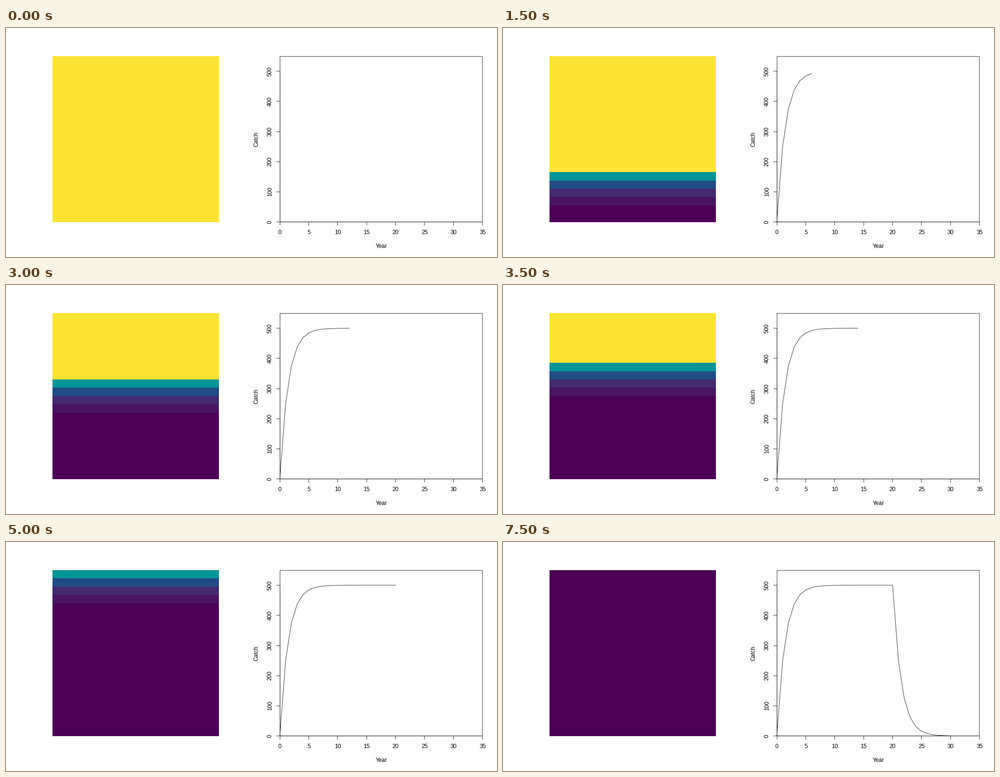
A matplotlib script for the animation above (7750 ms loop, 1024 by 480 pixels).

```python
import numpy as np
import matplotlib.pyplot as plt
from matplotlib.animation import FuncAnimation
from matplotlib.patches import Rectangle

plt.rcParams.update({"font.family": "Liberation Sans", "font.size": 12,
                     "text.hinting": "force_autohint", "path.simplify": False})

WIDTH, HEIGHT, DPI = 1024, 480, 72
FRAMES, INTERVAL = 31, 250
LINE = 14.4                                   # height of one margin line
LEFT, RIGHT = 512 + 4.1 * LINE, WIDTH - 2.1 * LINE
TOP, BOTTOM = 4.1 * LINE, HEIGHT - 5.1 * LINE
ROWS, LEVELS, YIELD = 20, 20, 500


def viridis_hcl(level):
    """Sequential hue-chroma-luminance ramp, level 0 (dark) to LEVELS - 1."""
    i = 1 - level / (LEVELS - 1)
    lum = 90 - 75 * i ** 1.1
    chroma = 95 - 55 * i
    hue = np.radians(75 + 225 * i)
    u = chroma * np.cos(hue) / (13 * lum) + 0.1978
    v = chroma * np.sin(hue) / (13 * lum) + 0.4683
    y = ((lum + 16) / 116) ** 3
    x = y * 9 * u / (4 * v)
    z = y * (12 - 3 * u - 20 * v) / (4 * v)
    rgb = np.array([[3.2406, -1.5372, -0.4986],
                    [-0.9689, 1.8758, 0.0415],
                    [0.0557, -0.2040, 1.0570]]) @ [x, y, z]
    rgb = np.clip(rgb, 0, 1)
    rgb = np.where(rgb > 0.00304, 1.055 * rgb ** (1 / 2.4) - 0.055, 12.92 * rgb)
    return tuple(np.clip(rgb, 0, 1))


PALETTE = [viridis_hcl(k) for k in range(LEVELS)]


def row_color(age):
    biomass = 0.5 ** max(age, 0)
    return PALETTE[int((LEVELS - 1e-5) * biomass)]


def px(year):
    return LEFT + (RIGHT - LEFT) * np.asarray(year) / 35


def py(catch):
    return BOTTOM - (BOTTOM - TOP) * np.asarray(catch) / 550


def crisp(values):
    return np.floor(values) + 0.5


fig = plt.figure(figsize=(WIDTH / DPI, HEIGHT / DPI), dpi=DPI, facecolor="white")
ax = fig.add_axes([0, 0, 1, 1])
ax.set(xlim=(0, WIDTH), ylim=(HEIGHT, 0))
ax.axis("off")


def stroke(xs, ys):
    line, = ax.plot(xs, ys, color="black", lw=0.75, snap=False,
                    solid_capstyle="round", solid_joinstyle="round")
    return line


def label(x, y, text, rotation=0):
    ax.text(x, y, text, ha="center", va="baseline", rotation=rotation,
            rotation_mode="anchor", color="black")


# Field rows, fished from the bottom up
side = BOTTOM - TOP
center = 4.1 * LINE + (RIGHT - LEFT) / 2
x0, x1 = round(center - side / 2), round(center + side / 2)
edges = np.round(BOTTOM - side * np.arange(ROWS + 1) / ROWS)
rows = [ax.add_patch(Rectangle((x0, hi), x1 - x0, lo - hi, lw=0, antialiased=False))
        for lo, hi in zip(edges[:-1], edges[1:])]

# Box, axes and labels
left, right, top, bottom = crisp(np.array([LEFT, RIGHT, TOP, BOTTOM]))
stroke([left, right, right, left, left], [bottom, bottom, top, top, bottom])
stroke([left, right], [bottom, bottom])
stroke([left, left], [bottom, crisp(py(500))])
for year in range(0, 36, 5):
    x = crisp(px(year))
    stroke([x, x], [bottom, BOTTOM + LINE / 2])
    label(px(year), BOTTOM + 1.8 * LINE, str(year))
for catch in range(0, 501, 100):
    y = crisp(py(catch))
    stroke([left, LEFT - LINE / 2], [y, y])
    label(LEFT - 1.2 * LINE, py(catch), str(catch), 90)
label((LEFT + RIGHT) / 2, BOTTOM + 3.8 * LINE, "Year")
label(LEFT - 3.2 * LINE, (TOP + BOTTOM) / 2, "Catch", 90)

years = np.arange(FRAMES)
catches = np.where(years <= ROWS, YIELD * (1 - 0.5 ** years),
                   YIELD * 0.5 ** (years - float(ROWS)))
curve = stroke([], [])


def update(year):
    for i, row in enumerate(rows):
        row.set_facecolor(row_color(year - i))
    curve.set_data(px(years[:year + 1]), py(catches[:year + 1]))
    return [*rows, curve]


anim = FuncAnimation(fig, update, frames=FRAMES, interval=INTERVAL,
                     repeat=True, repeat_delay=0, blit=False)
plt.show()
```
